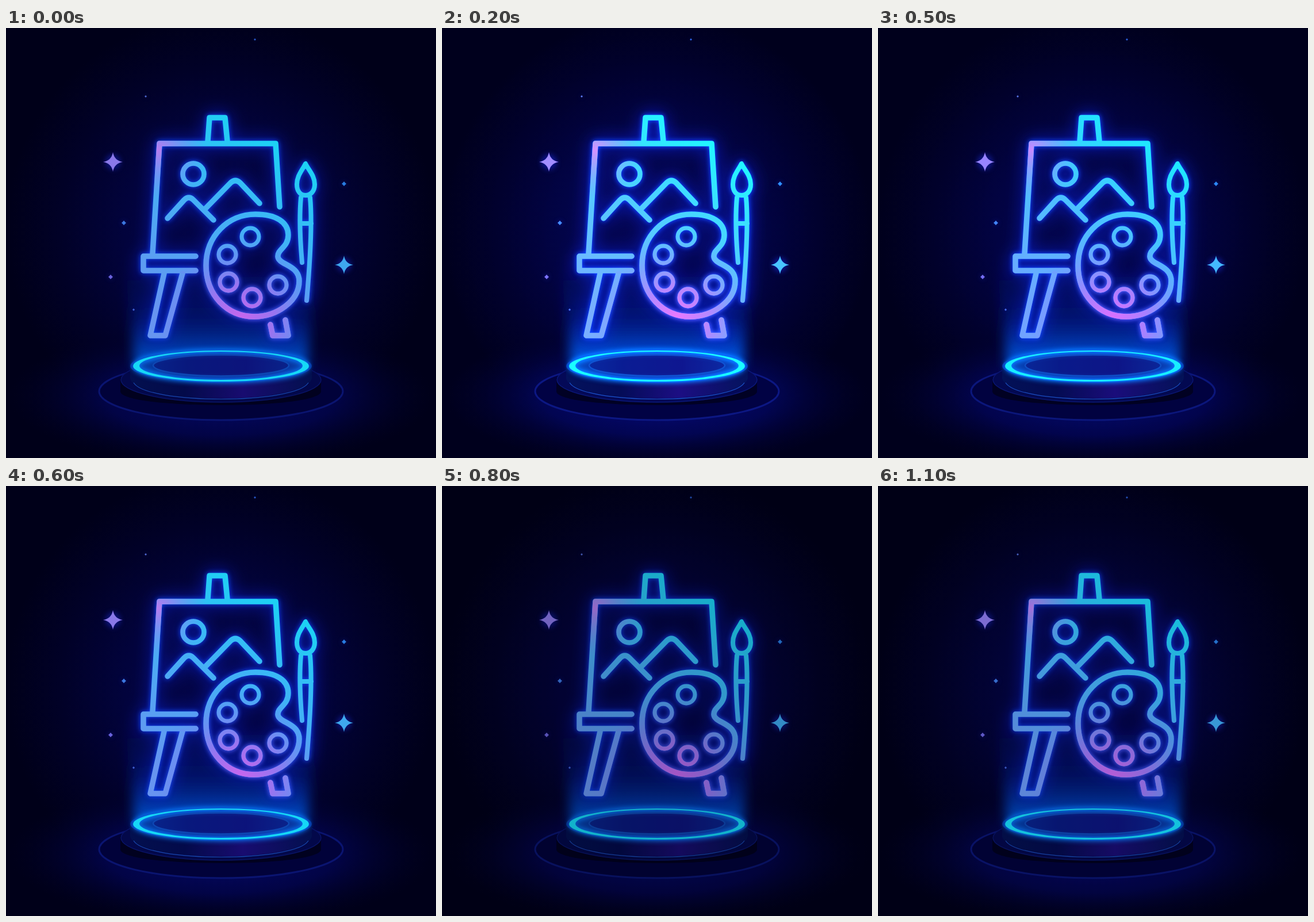
An HTML page for the animation above (1200 ms loop, 748 by 748 pixels).

```html
<!DOCTYPE html>
<html lang="en">
<head>
<meta charset="utf-8">
<title>Neon easel</title>
<style>
  html, body { margin: 0; width: 100%; height: 100%; overflow: hidden; background: #000012; }
  svg { display: block; width: 100vw; height: 100vh; }
</style>
</head>
<body>
<svg id="scene" viewBox="0 0 748 748">
  <defs>
    <radialGradient id="room" gradientUnits="userSpaceOnUse" cx="374" cy="350" r="375">
      <stop offset="0" stop-color="#03054c"/>
      <stop offset=".45" stop-color="#02033c"/>
      <stop offset=".75" stop-color="#010127"/>
      <stop offset="1" stop-color="#000019"/>
    </radialGradient>
    <radialGradient id="floor">
      <stop offset="0" stop-color="#04096a"/>
      <stop offset=".55" stop-color="#020448" stop-opacity=".95"/>
      <stop offset="1" stop-color="#010128" stop-opacity="0"/>
    </radialGradient>
    <linearGradient id="beam" x1="0" y1="0" x2="0" y2="1">
      <stop offset="0" stop-color="#0620a8" stop-opacity="0"/>
      <stop offset=".55" stop-color="#0628b0" stop-opacity=".35"/>
      <stop offset="1" stop-color="#0868f0" stop-opacity=".9"/>
    </linearGradient>
    <linearGradient id="neon" gradientUnits="userSpaceOnUse" x1="500" y1="220" x2="300" y2="520">
      <stop offset="0" stop-color="#1cd2f4"/>
      <stop offset=".4" stop-color="#42b2f6"/>
      <stop offset="1" stop-color="#6795f0"/>
    </linearGradient>
    <radialGradient id="pinkTop" gradientUnits="userSpaceOnUse" cx="265" cy="212" r="85">
      <stop offset="0" stop-color="#b87cf0"/>
      <stop offset="1" stop-color="#7c80f6" stop-opacity="0"/>
    </radialGradient>
    <radialGradient id="pinkLow" gradientUnits="userSpaceOnUse" cx="408" cy="505" r="150">
      <stop offset="0" stop-color="#c866ee"/>
      <stop offset=".4" stop-color="#a070f0" stop-opacity=".9"/>
      <stop offset="1" stop-color="#6a80f4" stop-opacity="0"/>
    </radialGradient>
    <linearGradient id="disc" x1="0" x2="1">
      <stop offset="0" stop-color="#0646b0"/>
      <stop offset=".3" stop-color="#061c80"/>
      <stop offset=".65" stop-color="#10107c"/>
      <stop offset="1" stop-color="#0646b0"/>
    </linearGradient>
    <linearGradient id="side" x1="0" x2="1">
      <stop offset="0" stop-color="#03104f"/>
      <stop offset=".3" stop-color="#030a4a"/>
      <stop offset=".62" stop-color="#180c70"/>
      <stop offset="1" stop-color="#03104f"/>
    </linearGradient>
    <filter id="halo" filterUnits="userSpaceOnUse" x="0" y="0" width="748" height="748" color-interpolation-filters="sRGB">
      <feGaussianBlur stdDeviation="15"/>
      <feComponentTransfer><feFuncA type="linear" slope="1.15"/></feComponentTransfer>
    </filter>
    <filter id="glow" filterUnits="userSpaceOnUse" x="0" y="0" width="748" height="748" color-interpolation-filters="sRGB">
      <feGaussianBlur stdDeviation="4.5"/>
    </filter>
    <filter id="soft" x="-50%" y="-50%" width="200%" height="200%"><feGaussianBlur stdDeviation="10"/></filter>

    <g id="icon" fill="none" stroke-width="9.5" stroke-linecap="round" stroke-linejoin="round">
      <path d="M351 197L354 156H381L385 197"/>
      <path d="M255 392L267 201H469L476 311"/>
      <path d="M330 397H239V422H330"/>
      <path d="M275 427L251 535H277L307 427"/>
      <path d="M460 516L464 535H491L486 508"/>
      <path d="M281 331L310 299Q318 291 326 299L361 334M346 315L391 269Q399 262 407 269L441 305"/>
      <circle cx="326" cy="254" r="18.5" stroke-width="8.5"/>
      <path d="M348 413C348 362 386 324 434 324C470 324 491 338 491 360C491 382 472 384 473 398C474 412 510 412 510 440C510 476 470 502 432 502C384 502 348 464 348 413Z"/>
      <g stroke-width="7">
        <circle cx="425" cy="363" r="15"/>
        <circle cx="385" cy="394" r="15"/>
        <circle cx="387" cy="442" r="15"/>
        <circle cx="428" cy="469" r="15"/>
        <circle cx="473" cy="447" r="15"/>
      </g>
      <path stroke-width="8" d="M521 236C515 248 506 257 506 272C506 284 512 291 521 291C530 291 537 284 537 272C537 257 527 248 521 236ZM513 295Q509 340 515 408M529 295Q534 350 523 474M512 340H531"/>
    </g>
  </defs>

  <rect width="748" height="748" fill="#000019"/>
  <rect width="748" height="748" fill="url(#room)"/>
  <ellipse cx="374" cy="640" rx="370" ry="125" fill="url(#floor)"/>

  <path d="M205 400H543L523 590H225Z" fill="url(#beam)" filter="url(#soft)"/>
  <g id="stars"></g>

  <ellipse cx="374" cy="632" rx="212" ry="50" fill="#01023a" stroke="#0a1470" stroke-width="3"/>
  <path d="M199 609V632C199 664 548 664 548 632V609Z" fill="#01011f"/>
  <ellipse cx="374" cy="612" rx="174" ry="39" fill="#03084a" stroke="#091468" stroke-width="1.5"/>
  <path d="M216 587V609C222 656 526 656 532 609V587Z" fill="url(#side)"/>
  <path d="M222 617C245 655 503 655 526 617" fill="none" stroke="#1848b0" stroke-width="1.2"/>
  <ellipse cx="374" cy="588" rx="158" ry="29" fill="#053098"/>
  <ellipse cx="374" cy="588" rx="149" ry="25" fill="url(#disc)"/>
  <ellipse cx="374" cy="588" rx="149" ry="25" fill="none" stroke="#087cff" stroke-width="9" filter="url(#glow)"/>
  <path fill="#16d8f6" fill-rule="evenodd" d="M221 588a153 27 0 1 0 306 0a153 27 0 1 0 -306 0M232 587.5a142 24.5 0 1 0 284 0a142 24.5 0 1 0 -284 0"/>
  <ellipse cx="374" cy="587" rx="118" ry="18.5" fill="#0b177c" fill-opacity=".6" stroke="#0d48b4" stroke-width="2.5"/>

  <use href="#icon" stroke="#0a20d0" filter="url(#halo)"/>
  <use href="#icon" stroke="#1048ff" filter="url(#glow)"/>
  <use href="#icon" stroke="url(#pinkLow)" filter="url(#glow)" opacity=".6"/>
  <use href="#icon" stroke="url(#neon)"/>
  <use href="#icon" stroke="url(#pinkTop)"/>
  <use href="#icon" stroke="url(#pinkLow)"/>
</svg>
<script>
  const LOOP = 1200, STEP = 100;
  const scene = document.getElementById('scene');

  // x, y, radius, colour, waist (inner width relative to the radius)
  const stars = [
    [186, 233, 17, '#8a78e8', .14], [588, 412, 16, '#3ea8ee', .14],
    [588, 271, 4, '#287ce0', .45], [205, 339, 4, '#3c78e0', .45],
    [182, 433, 4, '#6a62dc', .45], [222, 490, 2.2, '#4060d0', .45],
    [243, 119, 2, '#5068d0', .45], [433, 20, 2, '#2858c8', .45]
  ];

  function starPath(x, y, r, waist) {
    const w = r * waist;
    return `M${x} ${y - r}Q${x + w} ${y - w} ${x + r} ${y}Q${x + w} ${y + w} ${x} ${y + r}` +
           `Q${x - w} ${y + w} ${x - r} ${y}Q${x - w} ${y - w} ${x} ${y - r}Z`;
  }

  document.getElementById('stars').innerHTML = stars.map(([x, y, r, color, waist]) =>
    `<circle cx="${x}" cy="${y}" r="${r * .8}" fill="#1420b0" opacity=".55" filter="url(#glow)"/>` +
    `<path d="${starPath(x, y, r, waist)}" fill="${color}"/>`).join('');

  function render(ms) {
    const t = Math.floor(ms % LOOP / STEP) * STEP;
    const level = 1 + .2 * Math.sin(2 * Math.PI * t / LOOP);
    scene.style.filter = `brightness(${level.toFixed(3)})`;
  }

  let start;
  function tick(now) {
    start ??= now;
    render(now - start);
    requestAnimationFrame(tick);
  }
  render(0);
  requestAnimationFrame(tick);
</script>
</body>
</html>
```
